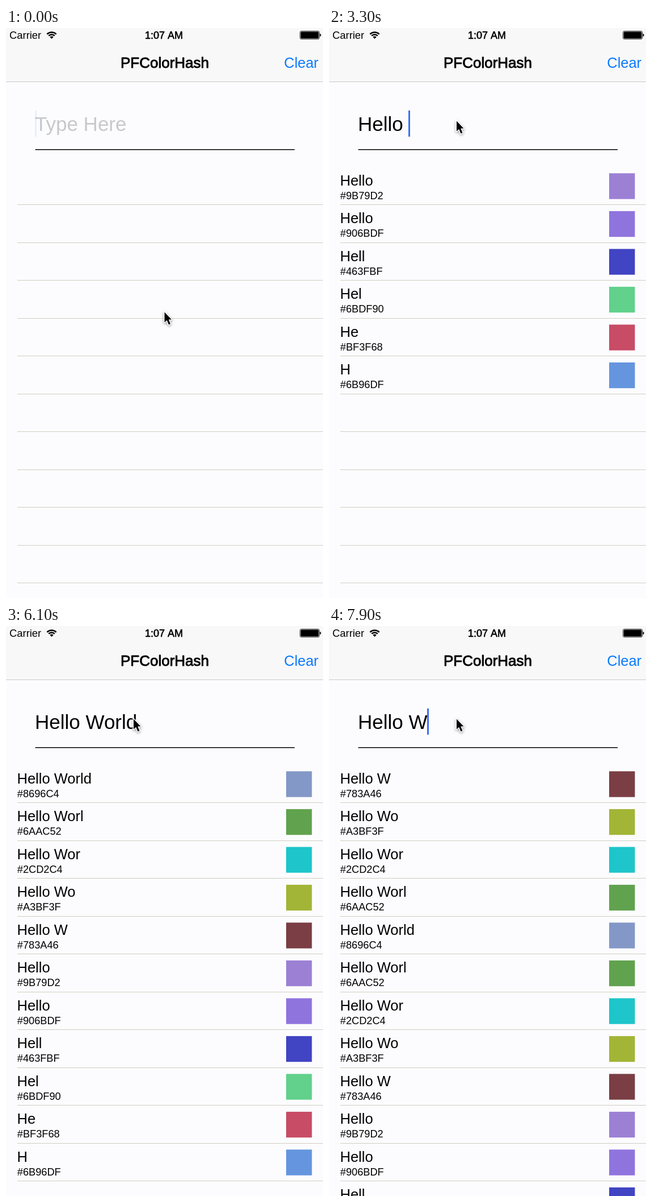
Write an HTML page with a canvas that moves like this. It is 559 px wide and 1002 px high and loops after 8 s.

```html
<!DOCTYPE html>
<html lang="en">
<head>
<meta charset="utf-8">
<title>PFColorHash</title>
<style>
html, body { margin: 0; width: 100%; height: 100%; overflow: hidden; background: #fcfcfe; }
canvas { display: block; }
</style>
</head>
<body>
<canvas id="stage" width="559" height="1002"></canvas>
<script>
const ctx = document.getElementById('stage').getContext('2d');
const LOOP = 8000, STEP = 100, ROW = 66.5;
const PHRASE = 'Hello World';

// Label and displayed swatch colour for each prefix of the phrase
const HASHES = [
  ['#6B96DF', '#6595de'], ['#BF3F68', '#c84c66'], ['#6BDF90', '#61d18b'],
  ['#463FBF', '#4144c3'], ['#906BDF', '#9074de'], ['#9B79D2', '#9c80d4'],
  ['#783A46', '#7a3e44'], ['#A3BF3F', '#a2b536'], ['#2CD2C4', '#1ec5ca'],
  ['#6AAC52', '#61a24e'], ['#8696C4', '#8398c7']
];

// [time, length of the typed text]
const EDITS = [
  [2000, 1], [2200, 2], [2300, 3], [2500, 4], [2700, 5], [3000, 6], [4300, 7],
  [4500, 8], [4700, 9], [4900, 10], [5300, 11],
  [7400, 10], [7600, 9], [7700, 8], [7900, 7]
];

const clamp = v => Math.max(0, Math.min(1, v));

function text(str, x, y, size, { color = '#000', align = 'left', stroke = 0 } = {}) {
  ctx.font = `${size}px "Liberation Sans", Arial, sans-serif`;
  ctx.textAlign = align;
  ctx.fillStyle = ctx.strokeStyle = color;
  ctx.fillText(str, x, y);
  if (stroke) {
    ctx.lineWidth = stroke;
    ctx.lineJoin = 'round';
    ctx.strokeText(str, x, y);
  }
  return ctx.measureText(str).width;
}

function rect(x, y, w, h, color) {
  ctx.fillStyle = color;
  ctx.fillRect(x, y, w, h);
}

function roundBox(x, y, w, h, r) {
  ctx.beginPath();
  ctx.roundRect(x, y, w, h, r);
}

function drawWifi() {
  ctx.strokeStyle = ctx.fillStyle = '#000';
  ctx.lineWidth = 2.4;
  for (const r of [7.5, 11.5]) {
    ctx.beginPath();
    ctx.arc(80.5, 19, r, -Math.PI * 0.75, -Math.PI * 0.25);
    ctx.stroke();
  }
  ctx.beginPath();
  ctx.moveTo(80.5, 19);
  ctx.arc(80.5, 19, 4.5, -Math.PI * 0.75, -Math.PI * 0.25);
  ctx.fill();
}

function drawBattery() {
  ctx.strokeStyle = ctx.fillStyle = '#000';
  ctx.lineWidth = 0.8;
  roundBox(518.4, 5.4, 34.2, 14.2, 2.5);
  ctx.stroke();
  roundBox(519.6, 6.6, 31.8, 11.8, 1.5);
  ctx.fill();
  roundBox(553.5, 10, 2, 5, [0, 2, 2, 0]);
  ctx.fill();
}

function drawBars() {
  rect(0, 0, 559, 94, '#f8f8f8');
  rect(0, 94, 559, 1, '#c9c9ce');
  text('Carrier', 6, 19, 18.4);
  drawWifi();
  text('1:07 AM', 278.5, 19, 18, { align: 'center', stroke: 0.6 });
  drawBattery();
  text('PFColorHash', 280, 69.6, 26, { align: 'center', stroke: 0.9 });
  text('Clear', 551, 69.6, 25.4, { align: 'right', color: '#0a7aff' });
}

// Solid, fade out, hidden, fade in
function caretAlpha(age) {
  const p = age % 1000;
  return p < 850 ? 1 - clamp((p - 500) / 210) : (p - 850) / 150;
}

function drawField(typed, age) {
  const width = typed
    ? text(typed, 51, 181, 35)
    : (text('Type Here', 51, 181, 35, { color: '#c7c7cd' }), 0);
  ctx.globalAlpha = caretAlpha(age);
  rect(51 + width - (typed ? 0.5 : 0), 145, 3, 46, '#3a70f2');
  ctx.globalAlpha = 1;
  rect(51.5, 213, 457.5, 1.5, '#000');
}

function drawRows(lengths) {
  for (let i = 0; i < 11; i++) rect(20, Math.floor(310.5 + ROW * i), 539, 1, '#cfcec2');
  lengths.forEach((length, i) => {
    const y = ROW * i, [label, color] = HASHES[length - 1];
    text(PHRASE.slice(0, length), 19.5, 276.8 + y, 25.5);
    text(label, 19.8, 300.8 + y, 18.2);
    rect(494, 255.4 + y, 45.4, 45.3, color);
  });
}

function drawPointer(t) {
  const k = clamp((t - 600) / 900), ease = k * k * (3 - 2 * k);
  ctx.save();
  ctx.translate(279.5 - 54.5 * ease, 499.5 - 336 * ease);
  const arrow = new Path2D('M0 0V18L4.2 14.2 7.5 22 10.5 20.7 7.3 13H12.5Z');
  ctx.lineWidth = 3;
  ctx.lineJoin = 'round';
  ctx.strokeStyle = '#fff';
  ctx.shadowColor = 'rgba(0,0,0,.4)';
  ctx.shadowBlur = 4;
  ctx.shadowOffsetY = 1.5;
  ctx.stroke(arrow);
  ctx.shadowColor = 'transparent';
  ctx.fillStyle = '#000';
  ctx.fill(arrow);
  ctx.restore();
}

function draw(now) {
  const t = Math.floor((now % LOOP) / STEP) * STEP;
  const done = EDITS.filter(([time]) => time <= t);
  const [lastEdit, length] = done.at(-1) || [-690, 0];
  rect(0, 0, 559, 1002, '#fcfcfe');
  drawBars();
  drawField(PHRASE.slice(0, length), t - lastEdit);
  drawRows(done.map(edit => edit[1]).reverse());
  drawPointer(t);
  requestAnimationFrame(draw);
}

requestAnimationFrame(draw);
</script>
</body>
</html>
```
